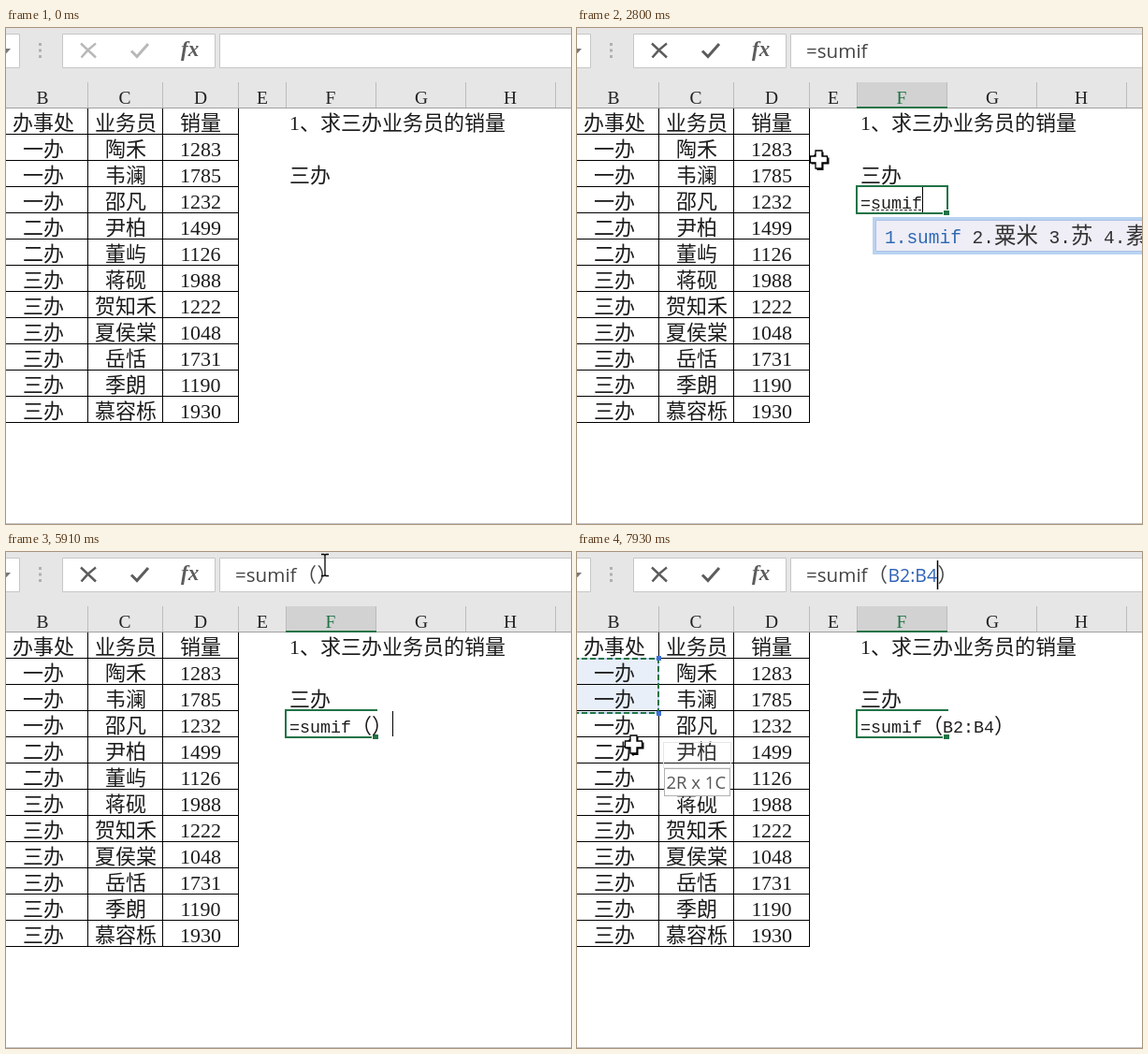
Write an HTML page that moves like this. It is 604x530 px and loops after 8000 ms.

```html
<!DOCTYPE html>
<html lang="zh-CN">
<head>
<meta charset="utf-8">
<title>SUMIF</title>
<style>
html, body { margin: 0; width: 100%; height: 100%; overflow: hidden; background: #fff; }
svg { display: block; width: 604px; height: 530px; }
text { white-space: pre; }
.cjk { font-family: "Noto Sans CJK SC Light", "Noto Sans CJK SC", "Noto Sans CJK", sans-serif; font-weight: 300; }
.num { font-family: "Liberation Serif", serif; }
.mono { font-family: "Liberation Mono", monospace; }
.ui { font-family: "Open Sans", "Noto Sans CJK SC", sans-serif; }
</style>
</head>
<body>
<svg viewBox="0 0 604 530" xmlns="http://www.w3.org/2000/svg">
  <rect width="604" height="530" fill="#fff"/>
  <rect width="604" height="85" fill="#e6e6e6"/>
  <g fill="#fff" stroke="#c6c6c6">
    <path d="M-1 6.5H14.5V42.5H-1M60.5 6.5H223.5V42.5H60.5ZM606 6.5H228.5V42.5H606"/>
  </g>
  <path d="M-4 22H5L0.5 27Z" fill="#777"/>
  <path d="M35 16h3v3h-3zm0 6.500h3v3h-3zm0 6.500h3v3h-3z" fill="#b0b0b0"/>
  <g id="icons" fill="none" stroke="#b8b8b8">
    <path d="M80 16.500L96 31.500M96 16.500Q87 23 80.500 31.500" stroke-width="2.400"/>
    <path d="M134 24.500L140 30.500L152 17" stroke-width="3"/>
  </g>
  <text x="187" y="30" class="num" font-size="23" font-weight="bold" font-style="italic" fill="#5c5c5c">fx</text>
  <rect id="colBg" x="300" y="58" width="95" height="27" fill="#d2d2d2"/>
  <g id="heads" class="num" font-size="19.500" text-anchor="middle"></g>
  <path d="M87.500 58V85M167.500 58V85M248.500 58V85M299.500 58V85M395.500 58V85M491.500 58V85M587.500 58V85" stroke="#bcbcbc"/>
  <path d="M0 85.500H604" stroke="#a0a0a0"/>
  <path id="colLine" d="M299 85H396" stroke="#217346" stroke-width="2"/>
  <path d="M0 529.500H604" stroke="#c6c6c6"/>
  <rect id="pickBg" y="114" width="87" fill="#e8eff9"/>
  <g id="table" fill="#1c1c1c"></g>
  <g id="pick">
    <path id="pickLine" fill="none" stroke="#c3d4f2" stroke-width="2"/>
    <path id="ants" fill="none" stroke="#217346" stroke-width="2" stroke-dasharray="6 3"/>
    <path id="knobs" fill="#3d6fd1"/>
  </g>
  <g id="cell">
    <path id="frame" fill="none" stroke="#217346" stroke-width="2"/>
    <path d="M391 194H399V201H391Z" fill="#fff"/>
    <path d="M392 195H398V200H392Z" fill="#217346"/>
  </g>
  <text id="cellText" x="303" y="193" fill="#1c1c1c"></text>
  <path id="under" stroke="#333" stroke-dasharray="3 2"/>
  <path id="caret" stroke="#000"/>
  <g class="ui" font-size="20.600" fill="#444">
    <text id="barText" x="245" y="32"></text>
    <text id="open" x="311" y="32" class="cjk" font-size="21">（</text>
    <text id="ref" x="332.500" y="32" font-size="19.400" fill="#2f62b5"></text>
    <text id="shut" y="32" class="cjk" font-size="21">）</text>
  </g>
  <path id="barCaret" stroke="#000" stroke-width="1.500"/>
  <g id="ime">
    <rect x="317.500" y="203.500" width="300" height="37" fill="#efedf6" stroke="#b9d3f0" stroke-width="3"/>
    <path d="M606 205.500H319.500V238.500H606" fill="none" stroke="#a9c3e6"/>
    <text id="first" x="329" y="230" fill="#2b69b3"></text>
    <text id="rest" y="230" fill="#333"></text>
    <path id="plus" d="M377.500 210.500h6v6h-6zM380.500 212v3M379 213.500h3" fill="none" stroke="#58b4d8"/>
  </g>
  <g id="tip">
    <rect id="ghost" x="92.500" y="203.500" width="72" height="27" fill="#fff" fill-opacity=".1" stroke="#e6e6e6"/>
    <g id="tipBox">
      <rect x="93.500" y="231.500" width="70" height="29" fill="#fff" stroke="#b0b0b0"/>
      <text x="95.500" y="253" class="ui" font-size="18.500" fill="#555">2R x 1C</text>
    </g>
  </g>
  <g id="cross">
    <path d="M-3 -9H4V-3H10V4H4V10.500H-3V4H-9V-3H-9Z" transform="translate(1 1)"/>
    <path d="M-3.500 -9.500H3.500V-3.500H9V3.500H3.500V9.500H-3.500V3.500H-9V-3.500H-3.500Z" fill="#fff" stroke="#000" stroke-width="1.300"/>
  </g>
  <g id="move">
    <path d="M0 -12L4.500 -7H1V-4H-1V-7H-4.500ZM0 12L4.500 7H1V4H-1V7H-4.500ZM-12 0L-7 -4.500V-1H-3V1H-7V4.500ZM12 0L7 -4.500V-1H3V1H7V4.500Z"/>
    <path d="M0 0V24L5.500 19L9.500 29L13.500 27L9.500 17.500H16Z" fill="#fff" stroke="#000" stroke-width="1.200"/>
  </g>
  <path id="beam" d="M-4 -11.500H-1L0 -10.500L1 -11.500H4M0 -10.500V10.500M-4 11.500H-1L0 10.500L1 11.500H4" fill="none" stroke="#000" stroke-width="1.300"/>
</svg>
<script>
const $ = id => document.getElementById(id);
const LOOP = 8000;

// Narrow characters take half an em, wide ones a full em.
const isWide = c => c > '\u2000';
const span = s => [...s].reduce((n, c) => n + (isWide(c) ? 1 : 0.5), 0);
const mixed = (s, size, latin = 'mono') =>
  (s.match(/[\u2001-\uffff]+|[^\u2001-\uffff]+/g) || []).map(run => {
    const wide = isWide(run[0]);
    const px = !wide && latin === 'mono' ? size / 1.2 : size;
    return `<tspan class="${wide ? 'cjk' : latin}" font-size="${px}">${run}</tspan>`;
  }).join('');

function setText(id, html) {
  const el = $(id);
  if (el.shown !== html) el.innerHTML = el.shown = html;
}
const attr = (id, name, value) => $(id).setAttribute(name, value);
const show = (id, on) => attr(id, 'visibility', on ? 'visible' : 'hidden');
// Last row whose time has come
const latest = (rows, t) => rows.filter(r => r[0] <= t).pop();
const within = (t, spans) => spans.some(([a, b]) => t >= a && t < b);

function buildSheet() {
  const cols = { B: 39, C: 127, D: 208, E: 274, F: 347, G: 444, H: 539 };
  $('heads').innerHTML = Object.entries(cols).map(([c, x]) =>
    `<text id="head${c}" x="${x}" y="81" fill="#222">${c}</text>`).join('');

  const rows = [
    ['办事处', '业务员', '销量'],
    ['一办', '陶禾', '1283'], ['一办', '韦澜', '1785'], ['一办', '邵凡', '1232'],
    ['二办', '尹柏', '1499'], ['二办', '董屿', '1126'],
    ['三办', '蒋砚', '1988'], ['三办', '贺知禾', '1222'], ['三办', '夏侯棠', '1048'],
    ['三办', '岳恬', '1731'], ['三办', '季朗', '1190'], ['三办', '慕容栎', '1930']
  ];
  const put = (x, y, s, anchor = 'start') =>
    `<text x="${x}" y="${y}" text-anchor="${anchor}">${mixed(s, 22, 'num')}</text>`;
  let lines = 'M87.5 86V422M167.5 86V422M248.5 86V422', html = '';
  rows.forEach((row, i) => {
    lines += `M0 ${113.5 + 28 * i}H249`;
    row.forEach((s, j) => { html += put([40, 128, 208][j], 109 + 28 * i, s, 'middle'); });
  });
  html += put(303, 109, '1、求三办业务员的销量') + put(303, 165, '三办');
  $('table').innerHTML = `<path d="${lines}" stroke="#000"/>` + html;
}

const typed = [
  [0, ''], [1560, '='], [2110, '=s'], [2260, '=su'], [2410, '=sum'],
  [2650, '=sumi'], [2800, '=sumif'], [4350, '=sumif（'], [4510, '=sumif（）']
];
const refs = [[0, ''], [7550, 'B2'], [7700, 'B2:B3'], [7930, 'B2:B4']];
const choices = [
  [1930, '1.是', '2.说 3.送 4.三 5.算'],
  [2260, '1.苏', '2.素 3.速 4.诉 5.塑'],
  [2410, '1.数码', '2.苏 3.素 4.速 5.诉'],
  [2650, '1.粟米', '2.苏 3.素 4.速 5.诉'],
  [2800, '1.sumif', '2.粟米 3.苏 4.素 5.速']
];
// Pointer legs: begin, end, steps, destination
const legs = [
  [70, 380, 5, 317, 203], [610, 840, 4, 315, 192], [1850, 2020, 3, 258.5, 140.5],
  [5440, 5910, 7, 341, 14], [6140, 6300, 3, 333, 21], [6530, 6930, 6, 248.5, 130.5],
  [7000, 7090, 2, 180, 199], [7150, 7300, 3, 98, 150],
  [7380, 7460, 2, 45, 128], [7620, 7930, 5, 60.5, 205.5]
];

function pointer(t) {
  let x = 380, y = 366;
  for (const [a, b, n, tx, ty] of legs) {
    if (t < a) break;
    const k = Math.min(1, (Math.floor((t - a) / (b - a) * (n - 1) + 1e-6) + 1) / n);
    x += (tx - x) * k;
    y += (ty - y) * k;
  }
  return [x, y];
}

function drawPointer(t) {
  const [x, y] = pointer(t);
  const kind = t < 70 ? '' : within(t, [[770, 1560]]) ? 'move' : t > 5600 && y < 44 ? 'beam' : 'cross';
  for (const id of ['cross', 'move', 'beam']) {
    show(id, id === kind);
    attr(id, 'transform', `translate(${x} ${y})`);
  }
}

function drawEntry(t) {
  const text = latest(typed, t)[1], ref = latest(refs, t)[1];
  const editing = t >= 1560, picked = t >= 690, closed = text.endsWith('）');
  attr('icons', 'stroke', editing ? '#5c5c5c' : '#b8b8b8');
  show('colBg', picked);
  show('colLine', picked);
  attr('headF', 'fill', picked ? '#217346' : '#222');
  show('cell', picked);
  attr('frame', 'd', closed ? 'M397 169H299V198H392' : 'M299 169H396V198H299Z');

  setText('cellText', mixed(closed ? text.slice(0, -1) + ref + '）' : text, 22));
  setText('barText', text.replace(/[（）]/g, ''));
  setText('ref', ref);
  show('open', text.includes('（'));
  show('shut', closed);
  const barX = ref ? (ref.length > 2 ? 385.5 : 356.5) : 332.5;
  attr('shut', 'x', barX);

  const caretX = Math.round(303 + span(text) * 22) + 0.5;
  attr('caret', 'd', `M${caretX} 170V197`);
  show('caret', within(t, [[1630, 3340], [3570, 4130], [4350, 5060], [5590, 6140]]));
  attr('barCaret', 'd', `M${barX} 9V40`);
  show('barCaret', t >= 6220);

  show('under', t >= 2110 && t < 3570);
  attr('under', 'd', `M315 194.5H${caretX - 1}`);
}

function drawIme(t) {
  const on = t >= 1930 && t < 3660, item = latest(choices, t);
  show('ime', on);
  show('plus', on && t < 2260);
  if (!on) return;
  const size = 23.4;
  setText('first', mixed(item[1], size));
  setText('rest', mixed(item[2], size));
  attr('rest', 'x', 329 + (span(item[1]) + 0.5) * size + (t < 2260 ? 9.5 : 0));
}

function drawPick(t) {
  const on = t >= 7550, bottom = t < 7780 ? 143 : 172;
  show('pick', on);
  show('pickBg', on);
  attr('pickBg', 'height', bottom - 115);
  const d = `M0 114H87V${bottom}H0`;
  attr('pickLine', 'd', d);
  attr('ants', 'd', d);
  attr('ants', 'stroke-dashoffset', -Math.floor(t / 100) * 2 % 9);
  attr('knobs', 'd', `M85 111h5v5h-5zM85 ${bottom - 2}h5v5h-5z`);
  const late = t >= 7930;
  show('ghost', late);
  show('tipBox', t >= 7780);
  attr('tipBox', 'transform', `translate(0 ${late ? 0 : -29})`);
}

function draw(t) {
  drawEntry(t);
  drawIme(t);
  drawPick(t);
  drawPointer(t);
}

buildSheet();
draw(0);
let begin;
requestAnimationFrame(function tick(now) {
  begin ??= now;
  draw((now - begin) % LOOP);
  requestAnimationFrame(tick);
});
</script>
</body>
</html>
```
